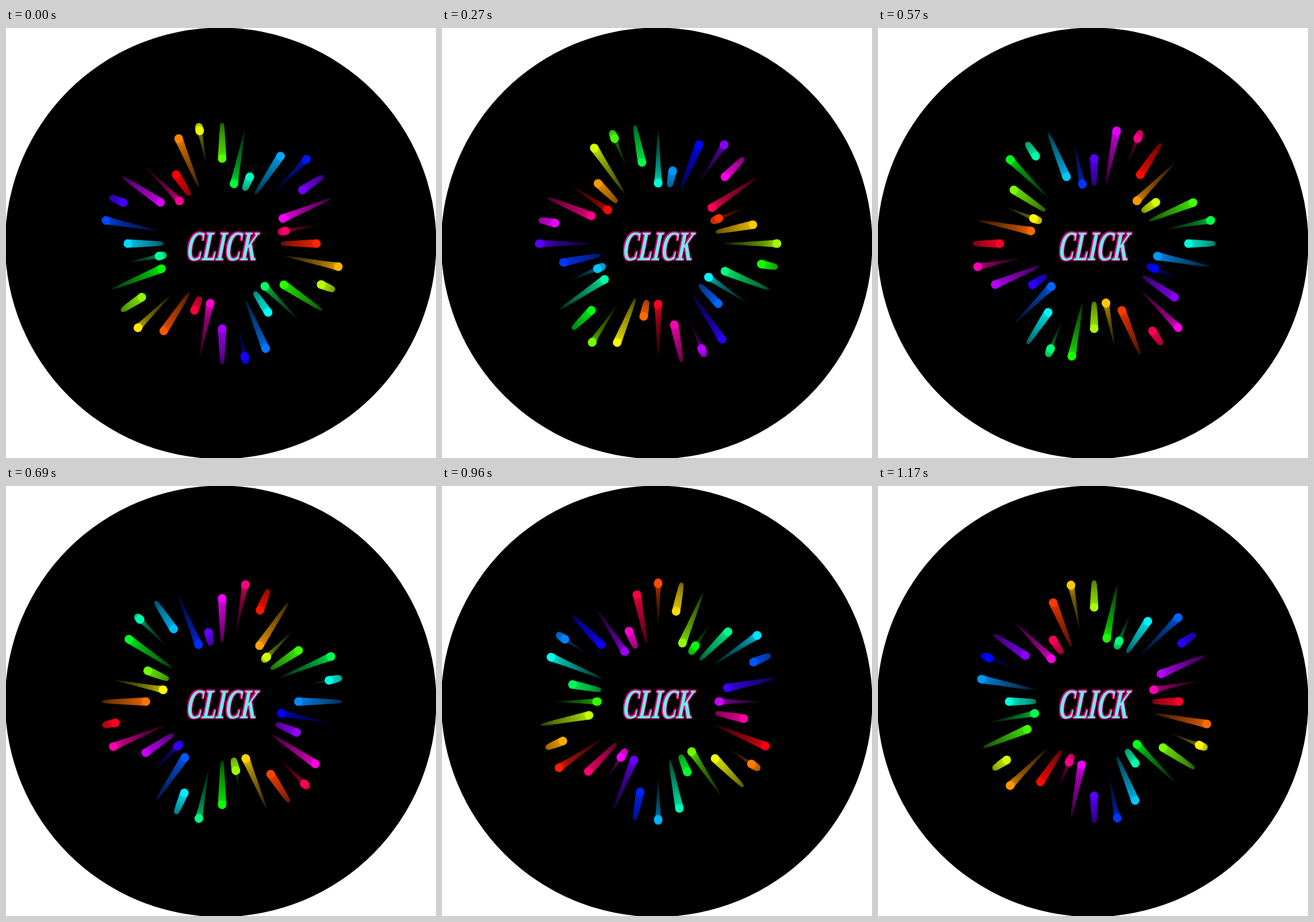
Write an HTML page without scripts that moves like this. It is 748x748 px and loops after 1200 ms.

```html
<!DOCTYPE html>
<html lang="en">
<head>
<meta charset="utf-8">
<title>Click</title>
<style>
  @property --phase {
    syntax: "<angle>";
    inherits: true;
    initial-value: 9deg;
  }

  html, body {
    margin: 0;
    width: 100%;
    height: 100%;
    overflow: hidden;
    background: #fff;
  }

  svg {
    display: block;
    width: 748px;
    height: 748px;
    animation: pulse 1200ms -1ms infinite;
  }

  /* 9 degrees per 30 ms; the opening pose is held for two ticks */
  @keyframes pulse {
    0% { --phase: 9deg; animation-timing-function: step-end; }
    2.5% { --phase: 9deg; animation-timing-function: steps(39); }
    100% { --phase: 360deg; }
  }

  /* --k: spoke number, --age: how far the dot lags behind its head */
  .dot {
    --fade: calc(1 - var(--age) / 150);
    cx: calc(156px + 51.5px * sin(var(--phase) + var(--k) * 67.5deg - var(--age) * 1deg));
    r: calc(7.5px * var(--fade));
    fill: hsl(calc(var(--phase) + var(--k) * 33.75deg) 100% calc(var(--glow) * var(--fade)));
    transform: rotate(calc(var(--k) * 11.25deg));
  }

  .trails { --glow: 43%; }
  .heads { --glow: 50%; --age: 0; }

  .label {
    filter: drop-shadow(1.7px 0 #d4006a) drop-shadow(-1.7px 0 #d4006a)
            drop-shadow(0 1.7px #d4006a) drop-shadow(0 -1.7px #d4006a);
  }

  text {
    font: italic bold 73px "Liberation Serif", serif;
    text-anchor: middle;
    fill: #6eeaf5;
  }
</style>
</head>
<body>
<svg viewBox="0 0 748 748">
  <defs>
    <g id="ring">
      <circle class="dot" style="--k:0"/>
      <circle class="dot" style="--k:1"/>
      <circle class="dot" style="--k:2"/>
      <circle class="dot" style="--k:3"/>
      <circle class="dot" style="--k:4"/>
      <circle class="dot" style="--k:5"/>
      <circle class="dot" style="--k:6"/>
      <circle class="dot" style="--k:7"/>
      <circle class="dot" style="--k:8"/>
      <circle class="dot" style="--k:9"/>
      <circle class="dot" style="--k:10"/>
      <circle class="dot" style="--k:11"/>
      <circle class="dot" style="--k:12"/>
      <circle class="dot" style="--k:13"/>
      <circle class="dot" style="--k:14"/>
      <circle class="dot" style="--k:15"/>
      <circle class="dot" style="--k:16"/>
      <circle class="dot" style="--k:17"/>
      <circle class="dot" style="--k:18"/>
      <circle class="dot" style="--k:19"/>
      <circle class="dot" style="--k:20"/>
      <circle class="dot" style="--k:21"/>
      <circle class="dot" style="--k:22"/>
      <circle class="dot" style="--k:23"/>
      <circle class="dot" style="--k:24"/>
      <circle class="dot" style="--k:25"/>
      <circle class="dot" style="--k:26"/>
      <circle class="dot" style="--k:27"/>
      <circle class="dot" style="--k:28"/>
      <circle class="dot" style="--k:29"/>
      <circle class="dot" style="--k:30"/>
      <circle class="dot" style="--k:31"/>
    </g>
  </defs>

  <circle cx="373.5" cy="374.5" r="375"/>

  <!-- Oldest to newest -->
  <g class="trails" transform="translate(376 375)">
    <use href="#ring" style="--age:145"/>
    <use href="#ring" style="--age:142"/>
    <use href="#ring" style="--age:139"/>
    <use href="#ring" style="--age:136"/>
    <use href="#ring" style="--age:133"/>
    <use href="#ring" style="--age:130"/>
    <use href="#ring" style="--age:127"/>
    <use href="#ring" style="--age:124"/>
    <use href="#ring" style="--age:121"/>
    <use href="#ring" style="--age:118"/>
    <use href="#ring" style="--age:115"/>
    <use href="#ring" style="--age:112"/>
    <use href="#ring" style="--age:109"/>
    <use href="#ring" style="--age:106"/>
    <use href="#ring" style="--age:103"/>
    <use href="#ring" style="--age:100"/>
    <use href="#ring" style="--age:96"/>
    <use href="#ring" style="--age:92"/>
    <use href="#ring" style="--age:88"/>
    <use href="#ring" style="--age:84"/>
    <use href="#ring" style="--age:80"/>
    <use href="#ring" style="--age:76"/>
    <use href="#ring" style="--age:72"/>
    <use href="#ring" style="--age:68"/>
    <use href="#ring" style="--age:64"/>
    <use href="#ring" style="--age:60"/>
    <use href="#ring" style="--age:55"/>
    <use href="#ring" style="--age:50"/>
    <use href="#ring" style="--age:45"/>
    <use href="#ring" style="--age:40"/>
    <use href="#ring" style="--age:35"/>
    <use href="#ring" style="--age:30"/>
    <use href="#ring" style="--age:25"/>
    <use href="#ring" style="--age:20"/>
    <use href="#ring" style="--age:15"/>
    <use href="#ring" style="--age:10"/>
    <use href="#ring" style="--age:5"/>
  </g>
  <use class="heads" href="#ring" transform="translate(376 375)"/>

  <g class="label">
    <text transform="translate(374 404) skewX(-6) scale(.55 1)">CLICK</text>
  </g>
</svg>
</body>
</html>
```
